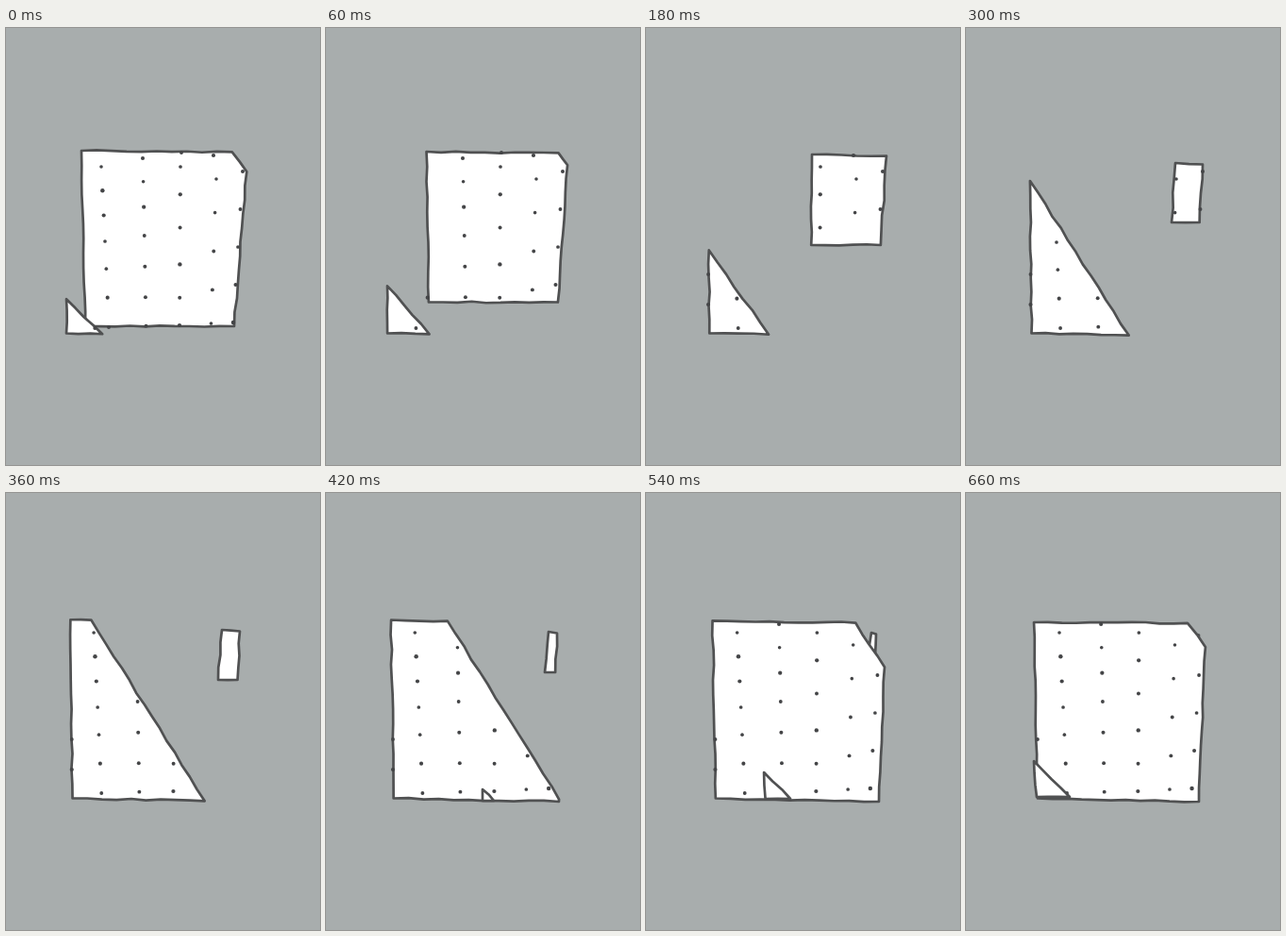
An HTML page with a canvas that plays this animation: 333 by 463 pixels, repeating every 0.69 s.

```html
<!DOCTYPE html>
<html>
<head>
<meta charset="utf-8">
<style>
html, body { margin: 0; width: 100%; height: 100%; overflow: hidden; background: #a8adad; }
canvas { display: block; width: 333px; height: 463px; }
</style>
</head>
<body>
<canvas id="stage" width="333" height="463"></canvas>
<script>
const ctx = document.getElementById('stage').getContext('2d');
const LOOP = 690;
const STEP = 30;
const HELD_STEPS = [30, 210, 390, 450, 570, 630]; // steps on which the picture does not change

// Key values shared by both sheets, eased linearly between these times
const KEY_TIMES = [0, 120, 180, 300, 420, 540, 660];
const OLD_LEFT = [80, 133, 176, 222, 236, 239, 241];
const OLD_TOP = [130, 132, 134, 143, 147, 148, 149];
const OLD_RIGHT = [257, 257, 255, 251, 245, 244, 247];
const OLD_BOTTOM = [316, 265, 230, 206, 190, 172, 158];
const CUT_BASE = [104, 118, 131, 173, 248, 346, 376];
const BASE_Y = 326;

// Dot columns: x, first y, last y, number of dots
const COLUMNS = [
  [101, 147, 317, 7],
  [145, 138, 310, 7],
  [185, 147, 315, 6],
  [223, 160, 313, 5],
  [251, 152, 312, 5]
];
const OLD_EDGE_DOTS = [[186, 132], [220, 135]];
const NEW_EDGE_DOTS = [[78, 260], [78, 292]];

const lerp = (a, b, p) => a + (b - a) * p;

function keyed(values, t) {
  const i = KEY_TIMES.findLastIndex(k => k <= t);
  if (i === KEY_TIMES.length - 1) return values[i];
  return lerp(values[i], values[i + 1], (t - KEY_TIMES[i]) / (KEY_TIMES[i + 1] - KEY_TIMES[i]));
}

function noise(n) {
  const v = Math.sin(n * 127.1 + 31.7) * 43758.5453;
  return (v - Math.floor(v)) * 2 - 1;
}

// Keeps the part of a polygon left of the slanted cut that meets BASE_Y at x = base
function cutPolygon(points, base, slope) {
  const side = ([x, y]) => base - (BASE_Y - y) / slope - x;
  return points.flatMap((a, i) => {
    const b = points[(i + 1) % points.length];
    const [da, db] = [side(a), side(b)];
    const kept = da >= 0 ? [a] : [];
    if (da * db < 0) {
      const p = da / (da - db);
      kept.push([lerp(a[0], b[0], p), lerp(a[1], b[1], p)]);
    }
    return kept;
  });
}

function oldSheet(t) {
  const [left, top, right, bottom] =
    [OLD_LEFT, OLD_TOP, OLD_RIGHT, OLD_BOTTOM].map(values => keyed(values, t));
  const lean = 4 - 8 * Math.min(1, t / 300);
  const taper = 15 * Math.exp(-t / 200);
  const box = [[left, top], [right, top + 1.5], [right - taper, bottom], [left + lean, bottom]];
  return cutPolygon(box, 385 + t * 0.1, 1.34);
}

function newSheet(t) {
  const p = t / 660;
  const box = [[64 + 8 * p, 134 + 3 * p ** 4], [255, 138], [247, 327], [64 + 12 * p, 323.5]];
  const slope = 1.6 - 0.63 * (t / 400 - 1) ** 2;
  return cutPolygon(box, keyed(CUT_BASE, t), slope);
}

function cornerSheet(t) {
  const p = (t - 420) / 240;
  const left = 166 - 94 * p ** 1.2;
  const size = 12 + 26 * p ** 0.7;
  const bottom = 326 - 4 * p;
  return [[left, bottom - size], [left + size, bottom], [left + 3 * p, bottom]];
}

// Closed outline with a slightly shaky hand-drawn edge
function outline(points, seed) {
  const path = new Path2D();
  points.forEach(([x, y], i) => {
    const [u, v] = points[(i + 1) % points.length];
    const length = Math.hypot(u - x, v - y) || 1;
    const parts = Math.ceil(length / 16);
    for (let k = 0; k < parts; k++) {
      const shake = k ? noise(seed + i * 30 + k) * 0.8 / length : 0;
      path.lineTo(lerp(x, u, k / parts) + (v - y) * shake, lerp(y, v, k / parts) - (u - x) * shake);
    }
  });
  path.closePath();
  return path;
}

function drawSheet(points, seed, dots = []) {
  const path = outline(points, seed);
  ctx.fillStyle = '#fff';
  ctx.strokeStyle = '#505152';
  ctx.lineWidth = 2.7;
  ctx.fill(path);
  ctx.stroke(path);
  ctx.fillStyle = '#444547';
  dots.forEach(([x, y], i) => {
    if (!ctx.isPointInPath(path, x, y) && !ctx.isPointInStroke(path, x, y)) return;
    ctx.beginPath();
    ctx.arc(x, y, 2 + noise(i) * 0.25, 0, Math.PI * 2);
    ctx.fill();
  });
}

// Columns fan inwards towards the bottom; their spacing swells and tightens
const DOTS = COLUMNS.flatMap(([x, first, last, count], col) =>
  Array.from({ length: count }, (_, row) => {
    const u = row / (count - 1);
    const swell = (6 - 0.375 * col * col) * Math.sin(Math.PI * u * Math.min(2, 1 + col / 2));
    return [x + (8 - 4.5 * col) * u, lerp(first, last, u) - swell];
  }));

function draw(t) {
  ctx.fillStyle = '#a8adad';
  ctx.fillRect(0, 0, 333, 463);
  ctx.lineJoin = 'round';

  const drift = 15 - 13 * t / 660;
  const newDots = DOTS.concat(NEW_EDGE_DOTS)
    .map(([x, y]) => [x - drift * (1.2 - x / 500), y + 1]);
  drawSheet(oldSheet(t), t, DOTS.concat(OLD_EDGE_DOTS));
  drawSheet(newSheet(t), t + 200, newDots);
  if (t >= 420) drawSheet(cornerSheet(t), t + 400);
}

function tick() {
  const now = performance.now() % LOOP;
  const t = Math.floor(now / STEP) * STEP;
  draw(HELD_STEPS.includes(t) ? t - STEP : t);
  requestAnimationFrame(tick);
}
tick();
</script>
</body>
</html>
```
